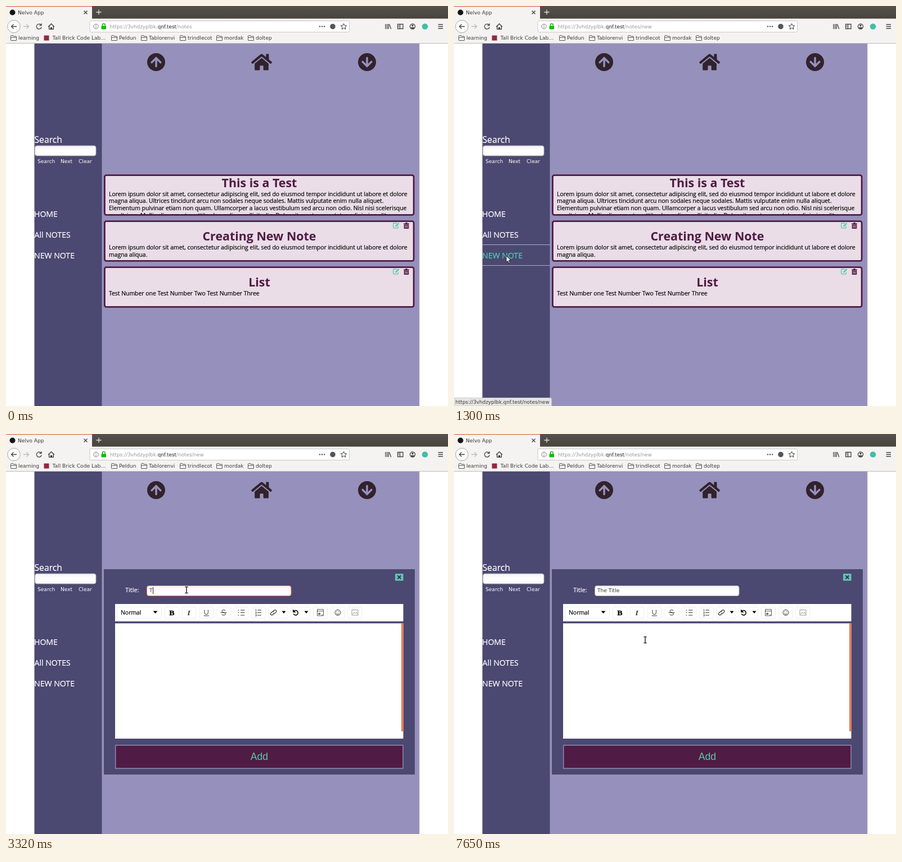
Animation of 786x713 px, one loop 8 s. Source, as an HTML page:

```html
<!DOCTYPE html>
<html lang="en">
<head>
<meta charset="utf-8">
<title>Notes</title>
<style>
  html, body { margin: 0; width: 100%; height: 100%; overflow: hidden; background: #fff; }
  svg { display: block; }
  text { white-space: pre; }
  .ui { font: 9.1px "DejaVu Sans", sans-serif; fill: #3a3a3a; }
  .url { font-size: 8.83px; }
  .page { font: 10.42px "Open Sans", "Noto Sans", sans-serif; stroke: #000; stroke-width: .2; }
  .head { font: bold 21.4px "Open Sans", "Noto Sans", sans-serif; fill: #501b44; text-anchor: middle; }
  .nav { font: 14.1px "Open Sans", "Noto Sans", sans-serif; fill: #fff; stroke: #fff; stroke-width: .2; }
  .line { fill: none; stroke: #444; stroke-width: 1.3; }
  .thin { fill: none; stroke: #333; stroke-width: 1; }
  .card { fill: #eadde7; stroke: #501b44; stroke-width: 2.8; }
  .field { fill: url(#shade); stroke: #aaa; }
</style>
</head>
<body>
<svg width="786" height="713" viewBox="0 0 786 713">
  <defs>
    <linearGradient id="shade" x2="0" y2="1">
      <stop stop-color="#f3f3f5"/><stop offset=".5" stop-color="#fff"/>
    </linearGradient>
    <linearGradient id="bar" x2="0" y2="1">
      <stop stop-color="#56514a"/><stop offset="1" stop-color="#48443d"/>
    </linearGradient>
    <clipPath id="inner"><path d="M177 303h546v68.500h-546z"/></clipPath>
    <path id="folder" d="M.5 9V1.500q0-1 1-1h3l1 1.500h4q1 0 1 1V9q0 .5-.5.5H1Q.5 9.500.5 9zM.5 4h10" fill="none" stroke="#555"/>
    <g id="tools">
      <path d="M7 1H1.500Q.7 1 .7 2v7q0 .8.8.8h7q.8 0 .8-.8V6.500" fill="none" stroke="#58c9b2" stroke-width="1.300"/>
      <path d="M4 7.500l.4-2.200L9.500.2l1.900 1.900-5.200 5.100z" fill="#58c9b2"/>
      <path d="M19 1.500h3l.6-1.500h2.800l.6 1.500h3V3H19zM19.700 3.500h8.600v6.700q0 .8-.8.8h-7q-.8 0-.8-.8z" fill="#501b44"/>
      <path d="M22 5v4.500m2-4.500v4.500m2-4.500v4.500" stroke="#eadde7" stroke-width=".8"/>
    </g>
    <g id="round">
      <circle r="16" fill="#32222d"/>
      <path d="M-7.800.6L0-7.200 7.800.6M0-6V7.600" fill="none" stroke="#9691bc" stroke-width="3.500" stroke-linecap="round"/>
    </g>
  </defs>

  <!-- browser frame -->
  <rect width="786" height="67" fill="#f4f3f1"/>
  <rect width="786" height="22.500" fill="url(#bar)"/>
  <rect width="153" height="23" fill="#f4f3f1"/>
  <rect width="153" height="1.300" fill="#d9744f"/>
  <circle cx="11.500" cy="11.500" r="5" fill="#151515"/>
  <text class="ui" x="21" y="15">Nelvo App</text>
  <path class="line" d="M138.500 8.500l6 6m0-6l-6 6"/>
  <path d="M160.500 11h9m-4.500-4.500v9" stroke="#ddd" stroke-width="1.300"/>
  <circle cx="14" cy="36.500" r="11.300" fill="#fbfbfa" stroke="#a9a7a3"/>
  <path class="line" d="M19 36.500H9.500m4-4l-4 4 4 4"/>
  <path class="line" d="M31 36.500h9.500m-4-4l4 4-4 4" style="stroke:#bbb"/>
  <path class="line" d="M62.500 34a4.500 4.500 0 1 0 .7 3.500M63 31v3.500h-3.500"/>
  <path class="line" d="M75 37l5.500-5.300L86 37m-9.300-1v5.300h7.600V36" style="stroke:#433"/>
  <rect x="79" y="38" width="3" height="4" fill="#433"/>
  <rect x="149" y="26.500" width="461.500" height="20" rx="2" fill="#fff" stroke="#c9c7c4"/>
  <circle cx="160" cy="36.500" r="4.200" fill="none" stroke="#777"/>
  <path d="M160 35.500v3.500m0-5.300v1" stroke="#777"/>
  <rect x="169.500" y="35.500" width="8.500" height="6" rx="1" fill="#12bc00"/>
  <path d="M171.300 36v-2a2.400 2.400 0 0 1 4.900 0v2" fill="none" stroke="#12bc00" stroke-width="1.500"/>
  <text class="ui url" x="184.500" y="40" style="fill:#999">https://3vhdzyplbk.<tspan fill="#222">qnf.test</tspan>/notes<tspan id="route"></tspan></text>
  <g fill="#555"><circle cx="558" cy="36.500" r="1.200"/><circle cx="562" cy="36.500" r="1.200"/><circle cx="566" cy="36.500" r="1.200"/></g>
  <circle cx="581" cy="36.500" r="4.800" fill="#555"/>
  <path class="thin" d="M600.500 31.300l1.600 3.400 3.700.4-2.800 2.500.8 3.700-3.300-1.900-3.300 1.900.8-3.700-2.800-2.500 3.700-.4z"/>
  <path class="line" d="M675 32v9m2.700-9v9m2.600-9v9m1.400-8.500l3 8.500"/>
  <path class="line" d="M696.500 32.500h9.500v8h-9.500zm4 0v8m-2.700-5.500h1m-1 2h1"/>
  <circle class="line" cx="723" cy="36.500" r="4.500"/>
  <circle cx="723" cy="35" r="1.700" fill="#444"/><path d="M719.500 38h7l-1.500 2.500h-4z" fill="#444"/>
  <circle cx="745" cy="36.500" r="5.300" fill="#3fbfa8"/>
  <path class="line" d="M768.500 33h8.500m-8.500 3.500h8.500m-8.500 3.500h8.500"/>
  <g id="marks"></g>
  <rect x="67.500" y="52.500" width="9" height="9" fill="#9a2440"/>
  <rect y="66" width="786" height="1" fill="#bcbab7"/>

  <!-- page -->
  <rect x="50.500" y="67" width="120.500" height="646" fill="#4b4871"/>
  <rect x="170.500" y="67" width="564.700" height="646" fill="#9691bc"/>
  <use href="#round" x="267" y="100"/>
  <use href="#round" transform="translate(642 100) scale(1 -1)"/>
  <path transform="translate(436 83.500) scale(.0645)" fill="#32222d" d="M280 148L96 300v164q0 16 16 16h112q16 0 16-16V368q0-16 16-16h64q16 0 16 16v96q0 16 16 16h112q16 0 16-16V300L296 148q-8-6-16 0zM572 251L488 183V44q0-12-12-12h-56q-12 0-12 12v73L318 43q-30-22-61 0L4 251q-9 8-2 17l26 31q8 9 17 2L280 107q8-6 16 0L531 301q9 7 17-2l25-31q7-9-1-17z"/>
  <text class="nav" x="50.500" y="244" style="font-size:15.700px">Search</text>
  <rect class="field" x="51.500" y="249" width="108.500" height="18" rx="3.500"/>
  <g class="ui" style="fill:#fff"><text x="56" y="280">Search</text><text x="97" y="280">Next</text><text x="129" y="280">Clear</text></g>
  <text class="nav" x="50" y="375.500">HOME</text>
  <text class="nav" x="50.500" y="412.500">All NOTES</text>
  <text class="nav" id="link" x="50" y="449.500">NEW NOTE</text>
  <path id="rules" d="M51 425.500H171M51 462.500H171" stroke="#aeabc6"/>
  <path id="edge" d="M170.500 425v38" stroke="#aeabc6"/>

  <rect class="card" x="175.400" y="301.600" width="549.700" height="70.700" rx="3"/>
  <rect class="card" x="175.400" y="383.600" width="549.700" height="70.700" rx="3"/>
  <rect class="card" x="175.400" y="465.600" width="549.700" height="70.700" rx="3"/>
  <use href="#tools" x="688" y="386"/>
  <use href="#tools" x="688" y="468"/>
  <text class="head" x="450.500" y="323">This is a Test</text>
  <text class="head" x="450.500" y="418">Creating New Note</text>
  <text class="head" x="450.500" y="500">List</text>
  <g class="page" id="body" clip-path="url(#inner)"></g>
  <g class="page">
    <text x="183" y="433.500">Lorem ipsum dolor sit amet, consectetur adipiscing elit, sed do eiusmod tempor incididunt ut labore et dolore</text>
    <text x="183" y="446.500">magna aliqua.</text>
    <text x="183" y="515.500">Test Number one Test Number Two Test Number Three</text>
  </g>

  <!-- note editor -->
  <g id="panel">
    <rect x="174" y="241" width="553" height="366" fill="#4b4871"/>
    <rect x="692" y="249" width="14.500" height="12.500" fill="#62c4b1"/>
    <path d="M696.300 252.300l6 6m0-6l-6 6" stroke="#33314f" stroke-width="2"/>
    <text class="page" x="212" y="282" fill="#fff" style="font-size:11px;stroke:#fff">Title:</text>
    <rect class="field" id="title" x="250.500" y="270.500" width="256.500" height="18" rx="3.500"/>
    <text class="ui" id="typed" x="255" y="282"></text>
    <rect id="caret" y="273" width="1" height="12" fill="#222"/>
    <rect x="194" y="303" width="512.500" height="31" fill="#fff"/>
    <g id="boxes" fill="none" stroke="#efefef"></g>
    <text class="page" x="204" y="322">Normal</text>
    <path d="M261.500 315.500h8l-4 4.500zm229 0h7l-3.500 4.500zm40 0h7l-3.500 4.500z"/>
    <g font-family="Liberation Serif, serif" font-size="13.500" text-anchor="middle">
      <text x="295" y="322.500" font-weight="bold" stroke="#000" stroke-width=".4">B</text>
      <text x="325" y="322.500" font-style="italic" stroke="#000" stroke-width=".2">I</text>
    </g>
    <path class="thin" d="M353 313.500v5a3.200 3.200 0 0 0 6.400 0v-5M351.500 324h9.500"/>
    <path class="thin" d="M390.500 315q-1-1.500-3.500-1.500-3 0-3 2.200 0 1.800 3 2.500 3.500.8 3.500 2.600 0 2.200-3.500 2.200-2.500 0-3.500-1.700M381.500 318.300h11"/>
    <path class="thin" d="M417 314h7.500m-7.500 4.500h7.500m-7.500 4.500h7.500M412.500 314h2m-2 4.500h2m-2 4.500h2"/>
    <path class="thin" d="M447 314h7m-7 4.500h7m-7 4.500h7M444.500 312.500v3m-.8 2h1.300v2h-1.300m0 2h1.300v3h-1.300"/>
    <path class="thin" d="M474.500 316.500l2.500-2.300q2-1.200 3.300.2t0 3.200l-2.500 2.200q-1.700 1-3-.4M476.500 320l-2.500 2.500q-1.500 1-2.900-.2t-.1-3l2.500-2.500q1.500-1 2.800.3" style="stroke-width:1.200"/>
    <path d="M511.500 316.500a4.200 4.200 0 1 1-.2 4" fill="none" stroke="#000" stroke-width="1.500"/>
    <path d="M510 312.500v5.500h5.500z"/>
    <path class="thin" d="M553.500 312.500h11v11.500h-11zm0 3h11m-8 3l-.7 4m2.700-4l-.7 4m-2.300-2.700h3.500m-3.800 1.400h3.500m2 1.300h2.500" style="stroke-width:.8"/>
    <circle class="thin" cx="590" cy="318.300" r="5"/>
    <path class="thin" d="M587 319.500q3 3.500 6 0M588.200 316v1.500m3.600-1.500v1.500"/>
    <path class="thin" d="M615 313.500h11v9.500h-11zm1 8l3-3.500 2 2 2-2.500 2.500 4m-7.500-5.500h1" style="stroke:#999"/>
    <rect x="194" y="337.500" width="512.500" height="205.500" fill="#fff"/>
    <rect x="703" y="337.500" width="3.500" height="192.500" fill="#e87b52"/>
    <rect id="caret2" x="195" y="348" width="1" height="14" fill="#111"/>
    <rect x="194.700" y="554.700" width="511.300" height="41.300" fill="#501b44" stroke="#9691bc" stroke-width="1.400"/>
    <text x="450.500" y="581" text-anchor="middle" fill="#4fcfa9" font-size="17.600" font-family="Liberation Sans, Arial, sans-serif">Add</text>
  </g>

  <g id="status">
    <path d="M0 698.500h171q2.500 0 2.500 2.500v12H0z" fill="#e6e5e3" stroke="#c4c2c0" stroke-width=".8"/>
    <text class="ui url" x="2.500" y="709">https://3vhdzyplbk.qnf.test/notes/new</text>
  </g>

  <g id="arrow"><path d="M0 0v11.500l2.600-2.300 1.900 4.300 1.900-.8-1.900-4.200h3.500z" fill="#fff" stroke="#111" stroke-width=".9"/></g>
  <g id="hand"><path d="M-1-1q1-1 2 0v4l4.500 1q1 .3 1 1.500-.2 3-1.500 5.500H-.5Q-1.500 8-4 5.500q.5-1.500 3 .5z" fill="#fff" stroke="#111"/></g>
  <g id="beam" fill="none">
    <path d="M-2.700-5.500h5.400M-2.700 5.500h5.400M0-5.500v11" stroke="#fff" stroke-width="3.200"/>
    <path d="M-2.700-5.500h5.400M-2.700 5.500h5.400M0-5.500v11" stroke="#333" stroke-width="1.600"/>
  </g>
</svg>
<script>
const $ = id => document.getElementById(id);
const show = (id, on) => { $(id).style.display = on ? '' : 'none'; };
const clamp = v => Math.max(0, Math.min(1, v));

$('marks').innerHTML = [[8, 'learning'], [187, 'Peldun'], [240, 'Tablorenvi'], [309, 'trindlecot'], [374, 'mordak'], [430, 'doltep']]
  .map(([x, name]) => `<use href="#folder" x="${x}" y="52"/><text class="ui" x="${x + 14}" y="60">${name}</text>`).join('') +
  '<text class="ui" x="82.5" y="60">Tall Brick Code Lab…</text>';

$('body').innerHTML = [
  'Lorem ipsum dolor sit amet, consectetur adipiscing elit, sed do eiusmod tempor incididunt ut labore et dolore',
  'magna aliqua. Ultrices tincidunt arcu non sodales neque sodales. Mattis vulputate enim nulla aliquet.',
  'Elementum pulvinar etiam non quam. Ullamcorper a lacus vestibulum sed arcu non odio. Nisl nisi scelerisque',
  'eu ultrices. Mollis aliquam ut porttitor leo a diam sollicitudin. Dolor sit amet consectetur adipiscing elit'
].map((s, i) => `<text x="183" y="${338.5 + i * 12.9}">${s}</text>`).join('');

$('boxes').innerHTML = [[198.5, 78], [282.5, 25], [313, 25], [344, 25], [375, 25], [405.5, 25], [436.5, 25], [467, 34], [506.5, 34], [546.5, 25], [577.5, 25], [608, 25]]
  .map(([x, w]) => `<rect x="${x}" y="308.5" width="${w}" height="20" rx="2"/>`).join('');

const title = 'The Title';
const keys = [3320, 3610, 3700, 3790, 4050, 4500, 4580, 4700, 4840];
// pointer stops: time, x, y
const path = [[440, 716, 364], [1010, 91, 449], [1180, 93, 445], [1360, 93, 445], [2040, 321, 278],
  [5400, 321, 278], [5440, 332, 277], [5670, 332, 277], [5870, 380, 391], [6050, 409, 408], [6430, 340, 367]];

function pointer(t) {
  const i = path.findIndex(p => p[0] > t);
  if (i < 0) return path[path.length - 1].slice(1);
  const [a, b] = [path[i - 1], path[i]];
  const k = (t - a[0]) / (b[0] - a[0]), e = k * k * (3 - 2 * k);
  return [a[1] + (b[1] - a[1]) * e, a[2] + (b[2] - a[2]) * e];
}

function movePointer(t) {
  let kind = '';
  if (t >= 440) {
    const [x, y] = pointer(t);
    const inTitle = x > 250 && x < 507 && y > 270 && y < 289;
    const inNote = x > 194 && x < 703 && y > 338 && y < 543;
    kind = t < 1250 && x < 124 ? 'hand' : t >= 1360 && (inTitle || inNote) ? 'beam' : 'arrow';
    $(kind).setAttribute('transform', `translate(${x} ${y})`);
  }
  for (const id of ['arrow', 'hand', 'beam']) show(id, id === kind);
}

function draw(t) {
  const open = t >= 1360, focus = t >= 2110 && t < 6480;
  const hover = open ? 0 : clamp((t - 1050) / 130);
  const mix = (a, b) => Math.round(a + (b - a) * hover);
  const ink = `rgb(${mix(255, 79)},${mix(255, 207)},${mix(255, 180)})`;
  $('link').style.fill = $('link').style.stroke = ink;
  $('rules').style.opacity = t >= 2110 ? 0 : open ? 1 : hover;
  show('edge', open && t < 2110);
  $('route').textContent = t >= 1250 ? '/new' : '';
  $('status').style.opacity = t < 1130 ? 0 : open ? clamp((1440 - t) / 160) : 1;
  show('panel', open);
  $('title').style.stroke = focus ? '#e87b52' : '';
  $('typed').textContent = title.slice(0, keys.filter(k => k <= t).length);
  show('caret', focus && t < 5670);
  if (focus) $('caret').setAttribute('x', 255.5 + $('typed').getComputedTextLength());
  show('caret2', t >= 6480 && t < 7650);
  movePointer(t);
}

function tick(now) {
  draw(now % 8000);
  requestAnimationFrame(tick);
}
draw(0);
requestAnimationFrame(tick);
</script>
</body>
</html>
```
